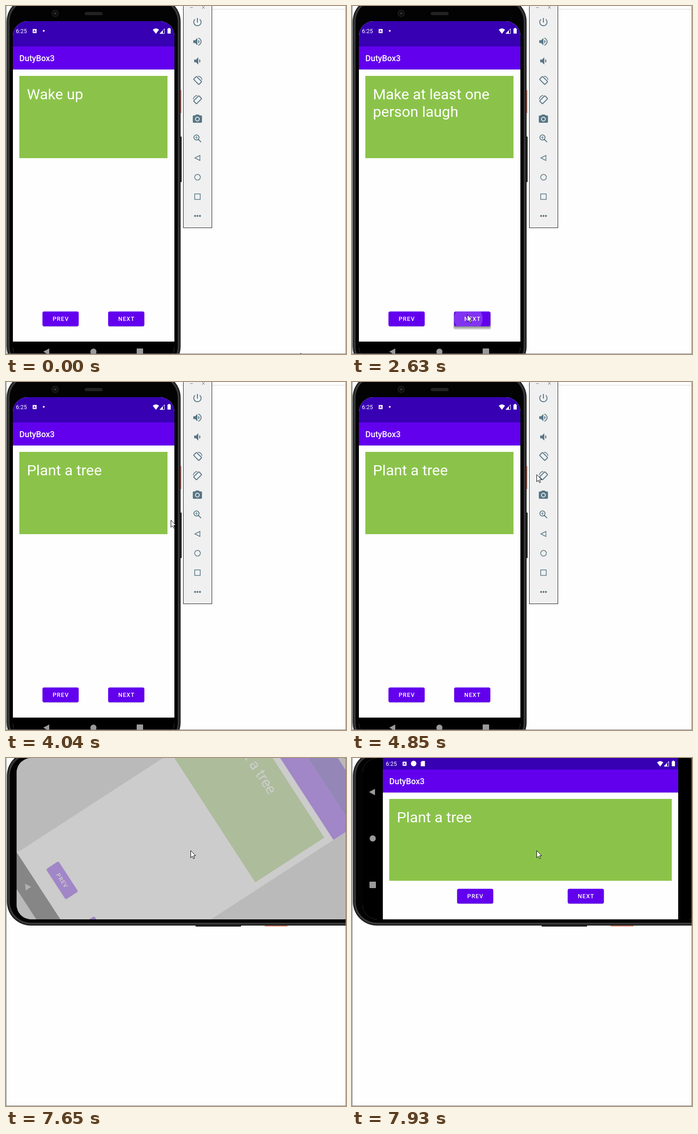
Write an HTML page with a canvas that moves like this. It is 739 px wide and 757 px high and loops after 8000 ms.

```html
<!DOCTYPE html>
<html lang="en">
<head>
<meta charset="utf-8">
<title>Phone emulator</title>
<style>
  html, body { margin: 0; width: 100%; height: 100%; overflow: hidden; background: #fefefe; }
  canvas { display: block; }
</style>
</head>
<body>
<canvas id="stage" width="739" height="757"></canvas>
<script>
const ctx = document.getElementById('stage').getContext('2d');
const LOOP = 8000;
const TITLE = 'DutyBox3';
const PURPLE = '#6200ee', DARK = '#3700b3', GREEN = '#8bc34a', SLATE = '#587787';
const TURN = 5000, SPIN = 7650, SETTLE = 7790, DONE = 7930;

// Step tables: [start ms, values...]
const CURSOR = [
  [0, 640, 755], [120, 633, 736], [250, 649, 717], [400, 430, 690], [520, 235, 645],
  [670, 207, 637], [820, 212, 641], [940, 222, 650], [1060, 232, 659], [1210, 249, 670],
  [1360, 250, 671], [3760, 264, 620], [3880, 305, 435], [4040, 358, 300],
  [4160, 396, 196], [4310, 397, 196], [4460, 401, 197], [4610, 401, 201]
];
const TODO = [
  [0, 'Wake up'], [1820, 'Pet a dog'],
  [2630, 'Make at least one', 'person laugh'], [3490, 'Plant a tree']
];
// radius, opacity, shadow depth
const RIPPLE = [
  [0, 0, 0, 2], [1670, 27, .17, 5], [1820, 42, .14, 5], [1940, 0, 0, 2],
  [2630, 31, .2, 8], [2780, 44, .12, 6], [2900, 0, 0, 2],
  [3370, 31, .2, 8], [3490, 44, .12, 6], [3610, 0, 0, 2]
];
const at = (steps, t) => steps.findLast(s => s[0] <= t).slice(1);

const ICONS = {
  power: 'M13 3h-2v10h2zM17.83 5.17l-1.42 1.42C18 7.86 19 9.81 19 12a7 7 0 1 1-11.42-5.42L6.17 5.17A9 9 0 1 0 17.83 5.17z',
  speaker: 'M3 9v6h4l5 5V4L7 9z',
  wave: 'M16.5 12c0-1.77-1.02-3.29-2.5-4.03v8.05c1.48-.73 2.5-2.25 2.5-4.02z',
  bigWave: 'M14 3.23v2.06a7 7 0 0 1 0 13.42v2.06a9 9 0 0 0 0-17.54z',
  camera: 'M9 2L7.17 4H4a2 2 0 0 0-2 2v12a2 2 0 0 0 2 2h16a2 2 0 0 0 2-2V6a2 2 0 0 0-2-2h-3.17L15 2zM17 12a5 5 0 1 1-10 0 5 5 0 1 1 10 0zM15.2 12a3.2 3.2 0 1 1-6.4 0 3.2 3.2 0 1 1 6.4 0z'
};
for (const name in ICONS) ICONS[name] = new Path2D(ICONS[name]);

function saved(draw) { ctx.save(); draw(); ctx.restore(); }
function rect(x, y, w, h, color) { ctx.fillStyle = color; ctx.fillRect(x, y, w, h); }
function round(x, y, w, h, r, color) {
  ctx.beginPath();
  ctx.roundRect(x, y, w, h, r);
  if (color) { ctx.fillStyle = color; ctx.fill(); }
}
function disc(x, y, r, color) {
  ctx.beginPath();
  ctx.arc(x, y, r, 0, 7);
  ctx.fillStyle = color;
  ctx.fill();
}
function poly(points, fill, stroke) {
  ctx.beginPath();
  points.forEach(([x, y]) => ctx.lineTo(x, y));
  ctx.closePath();
  if (fill) { ctx.fillStyle = fill; ctx.fill(); }
  if (stroke) { ctx.strokeStyle = stroke; ctx.stroke(); }
}
function text(str, x, y, size, weight = 400, color = '#fff') {
  ctx.font = `${weight} ${size}px Roboto, sans-serif`;
  ctx.fillStyle = color;
  ctx.fillText(str, x, y);
}

function button(label, x, y, [radius, opacity, depth] = [0, 0, 2]) {
  for (let i = 0; i < depth; i++) round(x - i / 4, y + 1, 78.7 + i / 2, 32 + i, 4, 'rgba(0,0,0,.07)');
  round(x, y, 78.7, 32.2, 3.6, PURPLE);
  if (radius) saved(() => {
    ctx.clip();
    disc(x + 31, y + 15.5, radius, `rgba(255,255,255,${opacity})`);
  });
  ctx.letterSpacing = '1.12px';
  ctx.textAlign = 'center';
  text(label, x + 39.9, y + 20.9, 12.5, 500);
  ctx.textAlign = 'left';
  ctx.letterSpacing = '0px';
}

// Clock, notification box and signal icons, placed by clock x, wifi x and centre y.
function statusBar(x, wifi, y) {
  text('6:25', x - .5, y + 5, 12.5);
  rect(x + 36, y - 4, 8.5, 9, '#fff');
  text('A', x + 37.6, y + 3, 7.5, 700, DARK);
  ctx.fillStyle = '#fff';
  ctx.beginPath();
  ctx.moveTo(wifi + 6.8, y + 6.5);
  ctx.lineTo(wifi, y - 2.5);
  ctx.quadraticCurveTo(wifi + 6.8, y - 8, wifi + 13.6, y - 2.5);
  ctx.fill();
  ctx.lineWidth = 1;
  poly([[wifi + 15.5, y + 6], [wifi + 25.5, y + 6], [wifi + 25.5, y - 4.5]], null, '#fff');
  poly([[wifi + 15, y + 6], [wifi + 22, y + 6], [wifi + 22, y - 1]], '#fff');
  round(wifi + 32, y - 5, 7, 11, 1, '#fff');
  rect(wifi + 34, y - 6.3, 3, 2, '#fff');
}

function navIcons(x1, y1, x2, y2, x3, y3) {
  const gray = '#9a9a9a';
  poly([[x1 - 7, y1], [x1 + 6, y1 - 7], [x1 + 6, y1 + 7]], gray);
  disc(x2, y2, 6.7, gray);
  round(x3 - 7, y3 - 7, 14, 14, 1, gray);
}

function appBar(x, y, w, h, titleY) {
  rect(x, y, w, h, PURPLE);
  rect(x, y + h, w, 1, 'rgba(0,0,0,.12)');
  text(TITLE, x + 14, titleY, 17.9, 500);
}

function portraitScreen(t) {
  rect(15, 33, 351, 741, '#fefefe');
  rect(15, 33, 351, 55, DARK);
  statusBar(22, 319, 54);
  disc(82, 54, 2, '#fff');
  appBar(15, 88, 351, 50, 120);
  rect(29, 152, 322, 179, GREEN);
  at(TODO, t).forEach((line, i) => text(line, 45.5, 203 + 38 * i, 32.2));
  button('PREV', 79.3, 664.5);
  button('NEXT', 222, 664.5, at(RIPPLE, t));
  rect(15, 730, 351, 44, '#000');
  navIcons(88, 752, 190, 752, 291, 752);
}

function landscapeScreen() {
  rect(23, 0, 741, 351, '#000');
  rect(67, 0, 642, 351, '#fefefe');
  rect(67, 0, 642, 25, DARK);
  statusBar(74, 663, 12);
  disc(134, 12, 6, '#fff');
  poly([[149.5, 9], [152, 6.5], [158.5, 6.5], [158.5, 18], [149.5, 18]], '#fff');
  appBar(67, 25, 642, 50, 57);
  rect(81, 89, 614, 178, GREEN);
  text('Plant a tree', 97.5, 140, 32.2);
  button('PREV', 228.4, 284.5);
  button('NEXT', 468.8, 284.5);
  navIcons(44, 74, 45, 175, 45, 276);
}

// The upright phone case: side keys, then nested rims from the outside in.
function phoneCase() {
  round(376, 183, 5.5, 50, 1, '#ee8a72');
  round(376, 284, 5.8, 99, 1, '#222');
  const rims = [[0, '#0c0c0c'], [1.2, '#2c2c2c'], [4.2, '#4c4c4c'], [5.4, '#1c1c1c'], [6.8, '#030303']];
  for (const [inset, color] of rims) {
    round(1.5 + inset, -18 + inset, 378 - 2 * inset, 811 - 2 * inset, 52 - inset, color);
  }
  disc(107, 16, 8, '#181818');
  disc(107, 16, 5, '#060606');
  disc(107, 16, 3, '#2c2c2c');
  round(171, 13, 39, 7, 3.5, '#222');
}

function rotateIcon(y, flip) {
  saved(() => {
    ctx.translate(416.5, y);
    ctx.scale(flip, 1);
    ctx.lineWidth = 1.5;
    ctx.beginPath();
    ctx.arc(0, 0, 9.6, -1.5, -.1);
    ctx.stroke();
    ctx.rotate(Math.PI / 4);
    ctx.lineWidth = 2;
    ctx.beginPath();
    ctx.roundRect(-8.1, -4.5, 16.2, 9, 1);
    ctx.stroke();
  });
}

function toolbar(hover) {
  rect(385, -2, 63, 485, '#1c1c1c');
  rect(386, -2, 61, 484, '#f0f0f0');
  if (hover) rect(399, 188, 36, 33, '#e2e2e2');
  const icon = (y, x, ...names) => saved(() => {
    ctx.translate(x, y - 12);
    ctx.fillStyle = SLATE;
    names.forEach(name => ctx.fill(ICONS[name], 'evenodd'));
  });
  icon(35, 404, 'power');
  icon(77.5, 404, 'speaker', 'wave', 'bigWave');
  icon(119.5, 406, 'speaker', 'wave');
  icon(246, 404, 'camera');
  ctx.strokeStyle = SLATE;
  rotateIcon(162, 1);
  rotateIcon(204, -1);

  ctx.lineWidth = 1.8;
  ctx.beginPath();
  ctx.arc(414, 286, 5.6, 0, 7);
  ctx.moveTo(418, 290);
  ctx.lineTo(424, 296);
  ctx.stroke();
  ctx.lineWidth = 1.2;
  ctx.beginPath();
  ctx.moveTo(411, 286); ctx.lineTo(417, 286);
  ctx.moveTo(414, 283); ctx.lineTo(414, 289);
  ctx.stroke();

  ctx.lineWidth = 1.5;
  poly([[410.5, 330.5], [421.5, 325], [421.5, 336]], null, SLATE);
  ctx.beginPath();
  ctx.arc(416.3, 372.5, 6.2, 0, 7);
  ctx.stroke();
  ctx.strokeRect(410.2, 408.7, 12, 12);
  for (const x of [411, 416.3, 421.6]) disc(x, 456.7, 2.1, SLATE);

  ctx.lineWidth = 1;
  ctx.strokeStyle = '#777';
  ctx.beginPath();
  ctx.moveTo(400, 3.5); ctx.lineTo(406, 3.5);
  ctx.moveTo(426, 0); ctx.lineTo(432, 6);
  ctx.moveTo(432, 0); ctx.lineTo(426, 6);
  ctx.stroke();
}

function cursor(x, y) {
  saved(() => {
    ctx.translate(x + .5, y + .5);
    ctx.lineWidth = 1;
    poly([[0, 0], [0, 15.5], [3.5, 12.2], [6, 17.5], [8.4, 16.5], [6, 11.3], [10.7, 11]], '#fff', '#000');
  });
}

function clipped(x, y, w, h, draw) {
  saved(() => {
    round(x, y, w, h, 32);
    ctx.clip();
    draw();
  });
}

// Draws inside the sideways display, turned about its centre.
function turned(degrees, cx, cy, draw) {
  saved(() => {
    ctx.translate(393.5, 175.5);
    ctx.rotate(degrees * Math.PI / 180);
    ctx.translate(-cx, -cy);
    draw();
  });
}

function upright(t) {
  rect(380, 6.5, 359, 1, '#d8d8d8');
  phoneCase();
  clipped(15, 33, 351, 741, () => portraitScreen(t));
  toolbar(t >= 4610 && t < 4850);
}

function sideways(t) {
  saved(() => {
    ctx.transform(0, 1, -1, 0, 795, -15);
    phoneCase();
  });
  clipped(23, 0, 741, 351, () => {
    rect(23, 0, 741, 351, '#bababa');
    if (t < SETTLE) {
      const spinning = t >= SPIN;
      turned(spinning ? 57 : 90, 190.5, 403.5, () => portraitScreen(t));
      if (spinning) rect(23, 0, 741, 351, 'rgba(186,186,186,.72)');
    } else {
      turned(t < DONE ? 2.6 : 0, 393.5, 175.5, landscapeScreen);
    }
  });
}

function frame(now) {
  const t = now % LOOP;
  rect(0, 0, 739, 757, '#fefefe');
  (t < TURN ? upright : sideways)(t);
  rect(0, 0, 1, 757, '#808080');
  rect(738, 0, 1, 757, '#808080');
  rect(0, 756, 739, 1, '#808080');
  cursor(...at(CURSOR, t));
  requestAnimationFrame(frame);
}
requestAnimationFrame(frame);
</script>
</body>
</html>
```
